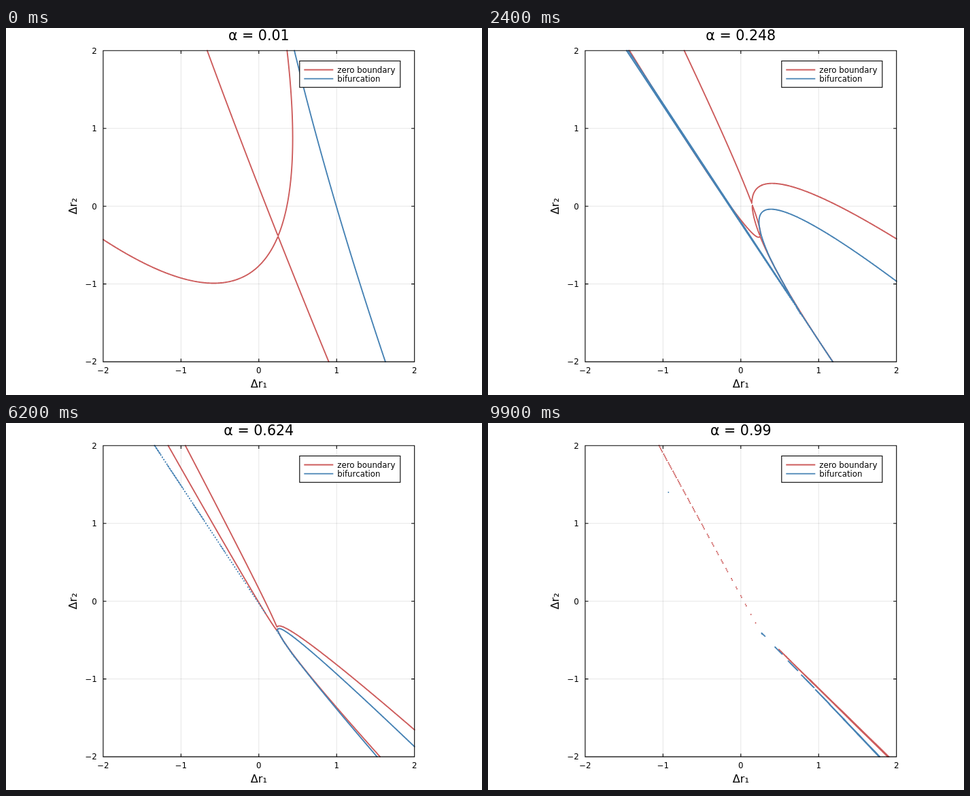
Recreate the animation shown at these times as an HTML page. Size 700 by 540 pixels, loop 10 s.

```html
<!DOCTYPE html>
<html lang="en">
<head>
<meta charset="utf-8">
<title>Zero boundary and bifurcation</title>
<style>
  html, body { margin: 0; width: 100%; height: 100%; overflow: hidden; background: #fff; }
  svg { display: block; width: 700px; height: 540px; font-family: "DejaVu Sans", sans-serif; }
  .tick { font-size: 11.8px; }
  .label { font-size: 16.2px; text-anchor: middle; }
  .title { font-size: 20.6px; text-anchor: middle; }
  .curve { fill: none; stroke-width: 1.9; stroke-linecap: round; }
  .zero { stroke: #cd5c5c; }
  .fold { stroke: #4682b4; }
  .axis { fill: none; stroke: #000; stroke-width: 1.1; }
  .grid { stroke: #000; stroke-opacity: .1; stroke-width: 1; }
</style>
</head>
<body>
<svg viewBox="0 0 700 540">
  <g id="grid" class="grid"></g>
  <path id="zero" class="curve zero"/>
  <path id="fold" class="curve fold"/>
  <g id="axes"></g>
  <text id="title" class="title" x="371.8" y="18.4"></text>
  <text class="label" x="371.8" y="529">Δr₁</text>
  <text class="label" transform="translate(103.6 262.2) rotate(-90)">Δr₂</text>
  <rect x="431.8" y="48.5" width="148" height="38.8" fill="#fff" stroke="#000" stroke-width="1.1"/>
  <path class="curve zero" style="stroke-linecap:butt" d="M438.3 61.5H481.3"/>
  <path class="curve fold" style="stroke-linecap:butt" d="M438.3 74.6H481.3"/>
  <text class="tick" x="487.2" y="65.8">zero boundary</text>
  <text class="tick" x="487.2" y="78.9">bifurcation</text>
</svg>
<script>
const STEPS = 100, STEP_MS = 100;
const SCALE = 114.45, CX = 371.8, CY = 262.2;
const N = 400, H = 4 / N;                 // contour grid over [-2, 2]²

// Equilibria solve K = A1 u + B1 u² + C u v + A2 v + B2 v²
const P = [0.247, -0.385];
const A1 = [0.4113, 1], B1 = [-22.05, 40.5];
const A2 = [-0.395, 1], B2 = [0.86, -0.843];
const C = [12.25, -14.97];

const $ = id => document.getElementById(id);
const px = x => CX + SCALE * x;
const py = y => CY - SCALE * y;
const cross = (a, b) => a[0] * b[1] - a[1] * b[0];

// Implicit form of the parabola K = A s + B s²
function parabola(A, B) {
  const ab = cross(A, B);
  return (x, y) => {
    const bk = B[0] * y - B[1] * x;
    return (A[0] * y - A[1] * x) * ab - bk * bk;
  };
}
const edge1 = parabola(A1, B1), edge2 = parabola(A2, B2);
const zeroField = (x, y) => edge1(x, y) * edge2(x, y);

// Discriminant of the quartic in v left after eliminating u
const e2 = cross(B1, B2), e1 = cross(B1, A2);
const f1 = cross(B1, C), f0 = cross(B1, A1);
const g3 = cross(C, B2), g2 = cross(C, A2) + cross(A1, B2), a12 = cross(A1, A2);
const qa = e2 * e2 - f1 * g3;
const qb = 2 * e2 * e1 - f1 * g2 - f0 * g3;

function foldField(x, y) {
  const e0 = B1[1] * x - B1[0] * y;
  const g1 = C[1] * x - C[0] * y + a12;
  const g0 = A1[1] * x - A1[0] * y;
  const c = e1 * e1 + 2 * e2 * e0 - f1 * g1 - f0 * g2;
  const d = 2 * e1 * e0 - f1 * g0 - f0 * g1;
  const e = e0 * e0 - f0 * g0;
  const I = 12 * qa * e - 3 * qb * d + c * c;
  const J = 72 * qa * c * e + 9 * qb * c * d - 27 * qa * d * d - 27 * e * qb * qb - 2 * c * c * c;
  return 4 * I * I * I - J * J;
}

// Marching squares, returned as path data
function contour(field, k) {
  const out = [];
  const fillRow = (row, j) => {
    const y = k * (j * H - 2 - P[1]);
    for (let i = 0; i <= N; i++) row[i] = field(k * (i * H - 2 - P[0]), y);
  };
  const point = (i, j) => px(i * H - 2).toFixed(2) + " " + py(j * H - 2).toFixed(2);
  const segment = (a, b) => out.push("M" + a + "L" + b);
  let low = new Float64Array(N + 1), high = new Float64Array(N + 1);
  fillRow(low, 0);
  for (let j = 0; j < N; j++) {
    fillRow(high, j + 1);
    for (let i = 0; i < N; i++) {
      const a = low[i], b = low[i + 1], c = high[i + 1], d = high[i];
      const sa = a > 0, sb = b > 0, sc = c > 0, sd = d > 0;
      if (sa === sb && sb === sc && sc === sd) continue;
      const hits = [];
      if (sa !== sb) hits.push(point(i + a / (a - b), j));
      if (sb !== sc) hits.push(point(i + 1, j + b / (b - c)));
      if (sc !== sd) hits.push(point(i + d / (d - c), j + 1));
      if (sd !== sa) hits.push(point(i, j + a / (a - d)));
      if (hits.length === 2) {
        segment(hits[0], hits[1]);
      } else if ((a + b + c + d > 0) === sa) {
        segment(hits[0], hits[1]);
        segment(hits[2], hits[3]);
      } else {
        segment(hits[0], hits[3]);
        segment(hits[1], hits[2]);
      }
    }
    [low, high] = [high, low];
  }
  return out.join("");
}

function buildAxes() {
  const L = px(-2), R = px(2), T = py(2), B = py(-2), t = 4.6;
  let grid = "", ticks = "", text = "";
  for (let n = -2; n <= 2; n++) {
    const x = px(n), y = py(n), name = String(n).replace("-", "−");
    if (Math.abs(n) < 2) grid += `M${x} ${T}V${B}M${L} ${y}H${R}`;
    ticks += `M${x} ${B}v${-t}M${x} ${T}v${t}M${L} ${y}h${t}M${R} ${y}h${-t}`;
    text += `<text class="tick" text-anchor="middle" x="${x}" y="507.6">${name}</text>` +
            `<text class="tick" text-anchor="end" x="133.8" y="${y + 4.3}">${name}</text>`;
  }
  $("grid").innerHTML = `<path d="${grid}"/>`;
  $("axes").innerHTML = `<path class="axis" d="M${L} ${T}H${R}V${B}H${L}Z${ticks}"/>` + text;
}

const cache = [];
function pose(step) {
  if (!cache[step]) {
    const alpha = 0.01 + 0.98 * step / (STEPS - 1);
    const k = alpha / (1 - alpha) ** 2;
    cache[step] = {
      title: "α = " + Number(alpha.toFixed(3)),
      zero: contour(zeroField, k),
      fold: contour(foldField, k)
    };
  }
  return cache[step];
}

let shown = -1;
function show(step) {
  if (step === shown) return;
  shown = step;
  const p = pose(step);
  $("title").textContent = p.title;
  $("zero").setAttribute("d", p.zero);
  $("fold").setAttribute("d", p.fold);
}

buildAxes();
show(0);
const start = performance.now();
function tick() {
  show(Math.floor((performance.now() - start) / STEP_MS) % STEPS);
  requestAnimationFrame(tick);
}
requestAnimationFrame(tick);
</script>
</body>
</html>
```
